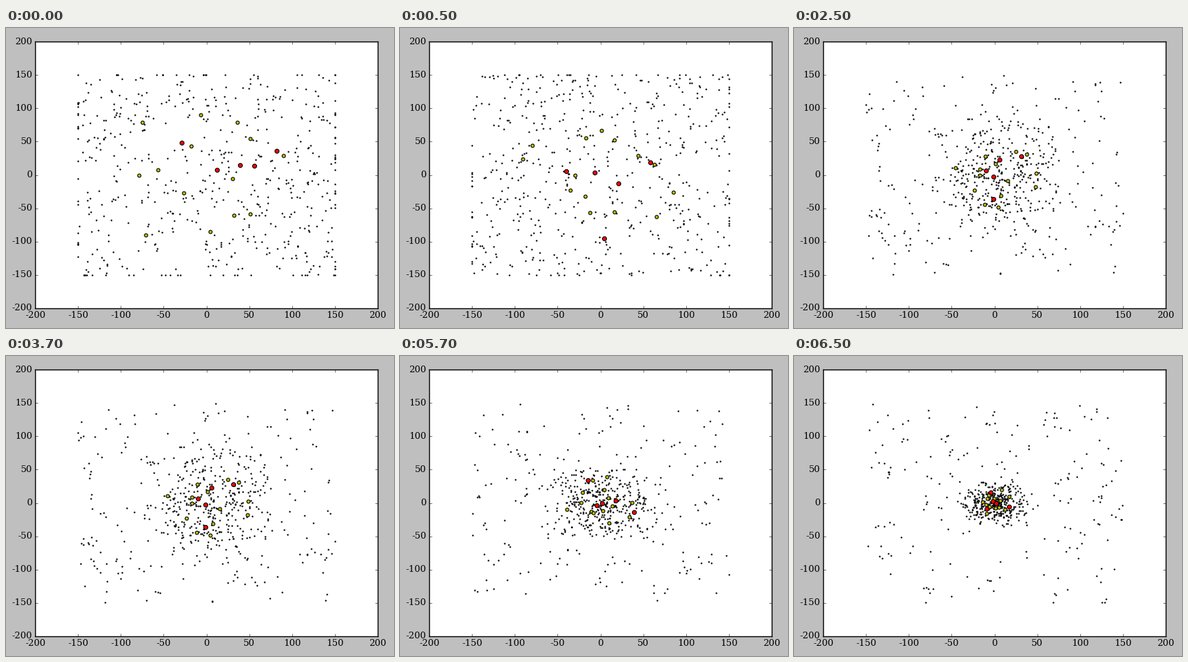
A matplotlib script for the animation above (8 s loop, 572x442 px).

```python
import matplotlib.pyplot as plt
import numpy as np
from matplotlib.animation import FuncAnimation

W, H, DPI = 572, 442, 80
LEFT, RIGHT, TOP, BOTTOM = 43, 548, 20, 413
LIMIT, BOUND = 200, 150
DOTS, SCOUTS = 560, 14

# Per generation: field spread, share of dots in the core, core half size,
# reach of the scouts, leader positions
GENERATIONS = [
    (1.10, 0.0, (1, 1), 115, [(-29, 48), (12, 8), (39, 15), (56, 14), (82, 36)]),
    (1.06, 0.0, (1, 1), 112, [(58, 19), (-40, 6), (-7, 4), (21, -13), (4, -95)]),
    (1.00, 0.6, (82, 100), 56, [(31, 28), (6, 23), (-10, 7), (-1, -3), (-1, -36)]),
    (1.00, 0.6, (68, 60), 42, [(-15, 34), (18, 4), (2, -1), (-4, -4), (39, -14)]),
    (1.00, 0.64, (40, 36), 24, [(-4, 16), (-2, 3), (2, 0), (-9, -9), (17, -6)]),
]


def make_swarm(rng, spread, share, half):
    core_count = int(DOTS * share)
    field = rng.uniform(-BOUND * spread, BOUND * spread,
                        (DOTS - core_count, 2))
    # Some dots keep close to a neighbour
    pairs = len(field) // 8
    field[:pairs] = field[pairs:2 * pairs] + rng.normal(0, 5, (pairs, 2))
    core = rng.triangular(-1, 0, 1, (core_count, 2)) * half
    return np.clip(np.vstack((field, core)), -BOUND, BOUND)


def make_scouts(rng, reach):
    angle = 2 * np.pi * (np.arange(SCOUTS) + rng.random(SCOUTS)) / SCOUTS
    radius = reach * rng.uniform(0.25, 1, SCOUTS)
    return np.column_stack((radius * np.cos(angle), radius * np.sin(angle)))


def make_generation(seed, spread, share, half, reach, leaders):
    rng = np.random.default_rng(seed)
    return make_swarm(rng, spread, share, half), make_scouts(rng, reach), leaders


plt.rcParams["font.family"] = "DejaVu Serif"
fig = plt.figure(figsize=(W / DPI, H / DPI), dpi=DPI, facecolor="0.75")
ax = fig.add_axes([LEFT / W, 1 - BOTTOM / H,
                   (RIGHT - LEFT) / W, (BOTTOM - TOP) / H])
ax.set(xlim=(-LIMIT, LIMIT), ylim=(-LIMIT, LIMIT))
ticks = range(-LIMIT, LIMIT + 1, 50)
ax.set_xticks(ticks, [str(t) for t in ticks])
ax.set_yticks(ticks, [str(t) for t in ticks], va="center")
ax.tick_params(direction="in", length=4, width=0.5, pad=4, labelsize=12,
               top=True, right=True)
for spine in ax.spines.values():
    spine.set_linewidth(1.3)


def add_dots(size, color, zorder):
    return ax.scatter([], [], s=size, c=color, edgecolors="black",
                      linewidths=1, zorder=zorder)


layers = [add_dots(1.4, "black", 2), add_dots(20, "#bfbf00", 3),
          add_dots(30, "red", 4)]
generations = [make_generation(seed, *settings)
               for seed, settings in enumerate(GENERATIONS)]


def update(i):
    # Half a second of the first generation, then two seconds for each next one
    for layer, points in zip(layers, generations[(i + 3) // 4]):
        layer.set_offsets(points)
    return layers


anim = FuncAnimation(fig, update, frames=16, interval=500, repeat=True,
                     repeat_delay=0, blit=False)
plt.show()
```
